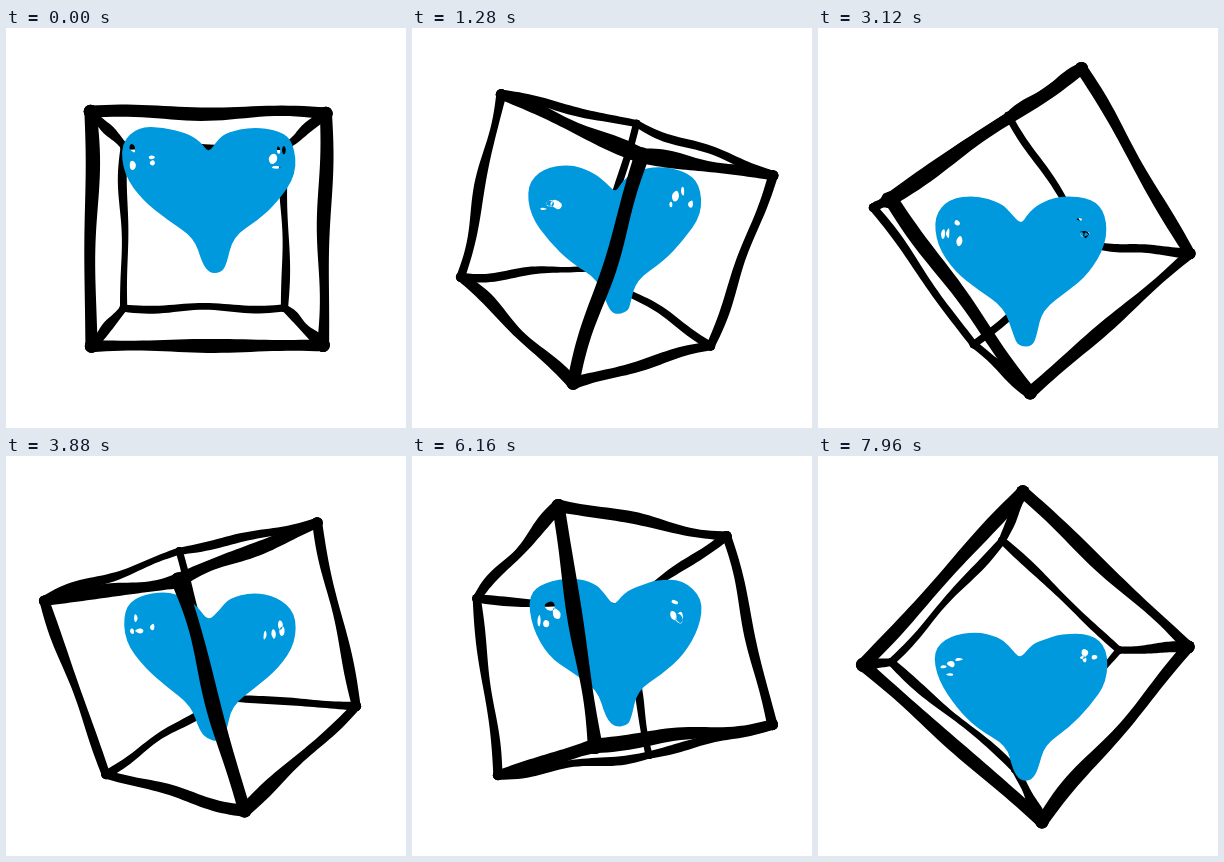
Animation of 400 by 400 pixels, one loop 8000 ms. Source, as an HTML page with a canvas:

```html
<!DOCTYPE html>
<html lang="en">
<head>
<meta charset="utf-8">
<title>Heart in a cube</title>
<style>
  html, body { margin: 0; width: 100%; height: 100%; overflow: hidden; background: #fff; }
  canvas { display: block; width: 400px; height: 400px; }
</style>
</head>
<body>
<canvas id="stage" width="400" height="400"></canvas>
<script>
const ctx = document.getElementById('stage').getContext('2d');
const LOOP = 8000, STEP = 40;
const HALF_TURN = 5200, PHASE = 30;
const CENTER = 200, CAMERA = 5.5, FOCAL = 526;
const HEART_X = 202, LEAN = 0.04, LIFT = 40;
const BLUE = '#0099de';

// Right half of the heart, from notch to tip, at its highest position
const HALF_HEART = [
  [0, 128], [11, 113], [22, 105], [43, 99], [70, 102], [85, 116],
  [84, 145], [66, 172], [45, 191], [18, 209], [11, 236], [5, 244]
];

// Cube corners as bits: 1 = x, 2 = y, 4 = z
const corner = i => [1, 2, 4].map(bit => i & bit ? 1 : -1);
const CORNERS = Array.from({ length: 8 }, (_, i) => corner(i));
const EDGES = CORNERS.flatMap((_, i) =>
  [1, 2, 4].filter(bit => !(i & bit)).map(bit => [i, i | bit]));

// Seeded generator of values between -1 and 1
function noiseFrom(seed) {
  let s = seed * 0x9e3779b1 | 0;
  return () => {
    s = s + 0x6d2b79f5 | 0;
    let v = Math.imul(s ^ s >>> 15, 1 | s);
    v = v + Math.imul(v ^ v >>> 7, 61 | v) ^ v;
    return ((v ^ v >>> 14) >>> 0) / 2147483648 - 1;
  };
}

// Spin about the upright axis while the cube tilts at half that speed
function project([x, y, z], spin) {
  const tilt = spin / 2;
  const up = y * Math.cos(tilt) - z * Math.sin(tilt);
  const out = z * Math.cos(tilt) + y * Math.sin(tilt);
  const depth = out * Math.cos(spin) - x * Math.sin(spin);
  const scale = FOCAL / (CAMERA - depth);
  return {
    x: CENTER + (x * Math.cos(spin) + out * Math.sin(spin)) * scale,
    y: CENTER - up * scale,
    z: depth,
    w: 9.2 * Math.pow(scale * CAMERA / FOCAL, 1.4)
  };
}

function dot({ x, y, w }) {
  ctx.beginPath();
  ctx.arc(x, y, w * 0.55, 0, Math.PI * 2);
  ctx.fill();
}

// A smooth random wave that is zero at both ends
function wave(amp, noise) {
  const a = noise() * amp, b = noise() * amp;
  return u => a * Math.sin(2 * Math.PI * u) + b * Math.sin(3 * Math.PI * u);
}

// A brush line with a wavering path and width
function brush(a, b, noise) {
  const dx = b.x - a.x, dy = b.y - a.y;
  const len = Math.hypot(dx, dy) || 1;
  const shift = wave(Math.min(1.8, len / 80), noise), swell = wave(0.18, noise);
  const left = [], right = [];
  for (let u = 0; u <= 1; u += 1 / 32) {
    const half = (a.w + (b.w - a.w) * u) / 2 * (1 + swell(u));
    const at = o => [a.x + dx * u - dy / len * o, a.y + dy * u + dx / len * o];
    left.push(at(shift(u) + half));
    right.unshift(at(shift(u) - half));
  }
  ctx.beginPath();
  left.concat(right).forEach(p => ctx.lineTo(...p));
  ctx.fill();
  dot(a);
  dot(b);
}

function smoothLoop(path, pts) {
  const mid = (p, q) => [(p[0] + q[0]) / 2, (p[1] + q[1]) / 2];
  path.moveTo(...mid(pts[pts.length - 1], pts[0]));
  pts.forEach((p, i) => path.quadraticCurveTo(...p, ...mid(p, pts[(i + 1) % pts.length])));
  path.closePath();
}

// Small gaps left between brush strokes in one lobe
function addGaps(path, side, dy, noise) {
  for (let i = 0; i < 4; i++) {
    const cx = HEART_X + side * 66 + noise() * 11;
    const cy = 130 + dy + noise() * 12;
    const rx = 3.5 + noise() * 2, ry = 4 + noise() * 2.5;
    const blob = [];
    for (let k = 0; k < 6; k++) {
      const angle = k * Math.PI / 3, r = 1 + noise() * 0.4;
      blob.push([cx + Math.cos(angle) * rx * r, cy + Math.sin(angle) * ry * r]);
    }
    smoothLoop(path, blob);
  }
}

function drawHeart(dy, noise) {
  const place = side => ([x, y]) => [
    HEART_X + side * x + (y - 100) * LEAN + noise() * 2,
    y + dy + noise() * 2
  ];
  const outline = new Path2D();
  smoothLoop(outline, [
    ...HALF_HEART.map(place(1)),
    ...HALF_HEART.slice(1).reverse().map(place(-1))
  ]);
  const body = new Path2D(outline);
  addGaps(body, -1, dy, noise);
  addGaps(body, 1, dy, noise);
  ctx.fillStyle = ctx.strokeStyle = BLUE;
  ctx.lineWidth = 3;
  ctx.lineJoin = 'round';
  ctx.fill(body, 'evenodd');
  ctx.stroke(outline);
}

function draw(step) {
  const noise = noiseFrom(step + 1);
  const spin = Math.PI * (step * STEP + PHASE) / HALF_TURN;
  const pts = CORNERS.map(c => {
    const p = project(c, spin);
    return { ...p, x: p.x + noise() * 1.3, y: p.y + noise() * 1.3 };
  });
  const lines = EDGES.map(([i, j]) => [pts[i], pts[j]]);
  const isFront = ([a, b]) => a.z + b.z > 0.8;
  const strokeAll = list => {
    ctx.fillStyle = '#000';
    list.forEach(([a, b]) => brush(a, b, noise));
  };

  ctx.fillStyle = '#fff';
  ctx.fillRect(0, 0, 400, 400);
  strokeAll(lines.filter(l => !isFront(l)));
  drawHeart(LIFT * (1 - Math.cos(2 * spin)), noise);
  strokeAll(lines.filter(isFront));
}

function tick() {
  draw(Math.floor(performance.now() % LOOP / STEP));
  requestAnimationFrame(tick);
}
tick();
</script>
</body>
</html>
```
